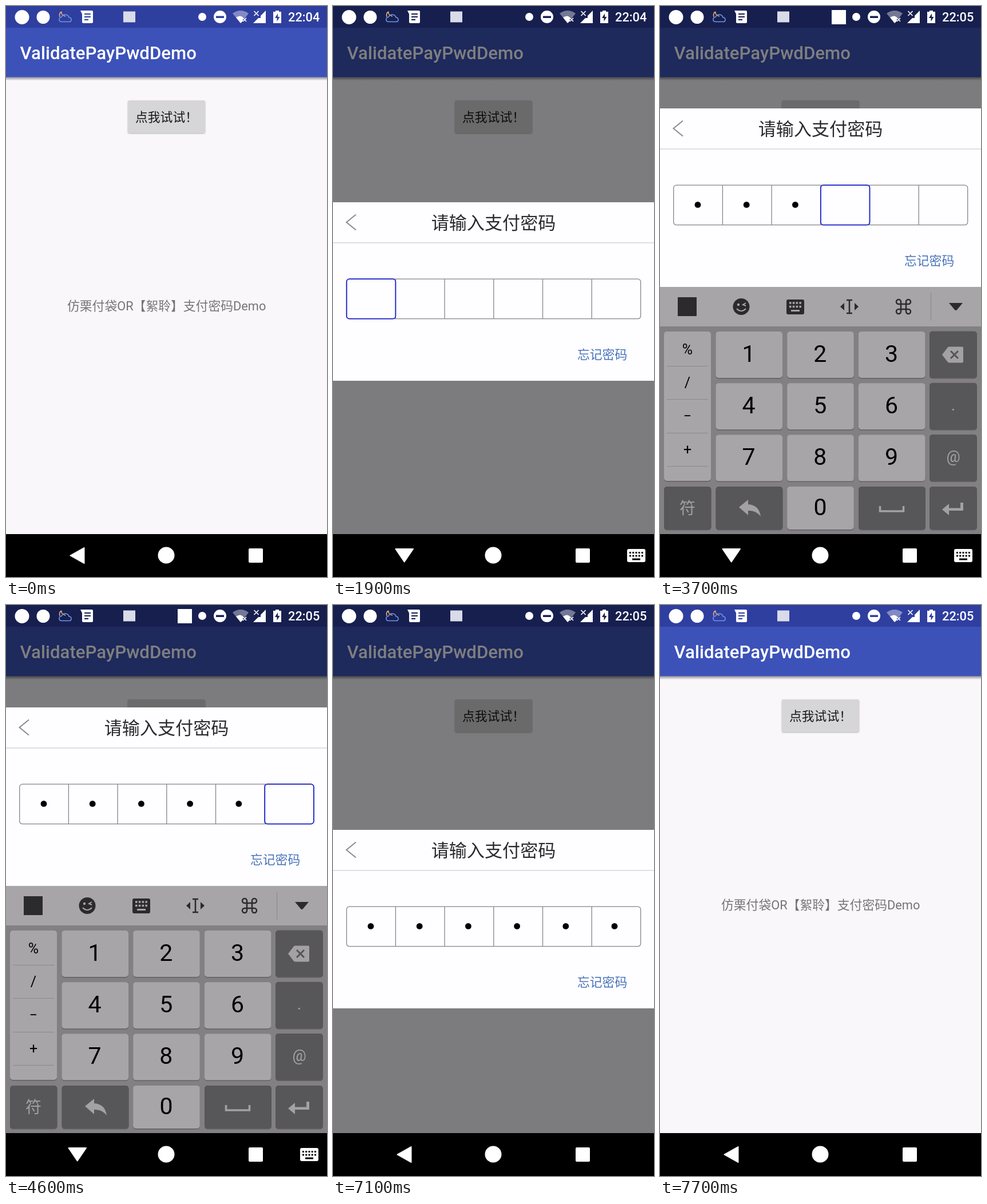
An HTML page that plays this animation: 561 by 998 pixels, repeating every 8000 ms.

```html
<!DOCTYPE html>
<html lang="zh-CN">
<head>
<meta charset="utf-8">
<title>ValidatePayPwdDemo</title>
<style>
html, body { margin: 0; width: 100%; height: 100%; overflow: hidden; background: #000; }
svg { display: block; width: 100%; height: 100%; }
text { font: 21.8px Roboto, "Noto Sans CJK SC", "Noto Sans CJK", sans-serif; white-space: pre; }
.mid { text-anchor: middle; }
.line { fill: none; stroke-linecap: butt; }
</style>
</head>
<body>
<svg viewBox="0 0 561 998" lang="zh-CN">
  <defs>
    <linearGradient id="shade" x2="0" y2="1">
      <stop stop-color="#000" stop-opacity=".4"/><stop offset="1" stop-color="#000" stop-opacity="0"/>
    </linearGradient>
    <filter id="lift" x="-10%" y="-10%" width="120%" height="130%">
      <feDropShadow dx="0" dy="1" stdDeviation="1.3" flood-opacity=".3"/>
    </filter>
  </defs>

  <g id="app">
    <rect width="561" height="923" fill="#faf7fb"/>
    <rect width="561" height="124.500" fill="#3c52b9"/>
    <rect width="561" height="38" fill="#2f3f9f"/>
    <rect y="124.500" width="561" height="6" fill="url(#shade)"/>
    <text x="24.600" y="93" fill="#fff" style="font-size:31.2px;font-weight:500">ValidatePayPwdDemo</text>
    <rect id="button" x="213" y="165" width="135" height="57" rx="3" filter="url(#lift)"/>
    <text x="226" y="201.500" fill="#181818">点我试试！</text>
    <text x="107" y="532" fill="#757477">仿栗付袋OR【絮聆】支付密码Demo</text>
  </g>
  <rect id="dim" width="561" height="923" opacity="0"/>

  <g id="status" fill="#fff">
    <circle cx="28" cy="19.500" r="12.500"/>
    <circle cx="65" cy="19.500" r="11.500"/>
    <path class="line" d="M97 10q-1 6 7 8M97 10q-5 3-3 9" stroke="#e8b070" stroke-width="1.600"/>
    <path class="line" d="M97 27.500q-4 0-4-4t4-4q2-5 7-4.500t6 5q4 0 4 4t-4 3.500z" stroke="#6f96ea" stroke-width="1.600"/>
    <path fill-rule="evenodd" d="M130 8h20q2 0 2 2v18q0 2-2 2h-15q-2 0-2-2V14zM137 13v2h11v-2zM137 18v2h11v-2zM137 23v2h7v-2z"/>
    <rect x="205" y="9.500" width="21" height="19" fill="#d9dbe8"/>
    <rect id="imeMark" x="300" y="7" width="25" height="25"/>
    <circle cx="343" cy="19" r="7"/>
    <path fill-rule="evenodd" d="M374 8a11 11 0 1 1 0 22a11 11 0 1 1 0-22zM367 17.500v3.500h14v-3.500z"/>
    <path d="M396 13q14-10 28 0l-7 9h-3v4l-4 4z" opacity=".4"/>
    <path d="M402 20q8-5 12 0v6l-4 4z"/>
    <path class="line" d="M414 21l6 6m0-6l-6 6M433.500 9l8 8m0-8l-8 8" stroke="#fff" stroke-width="1.700"/>
    <path d="M454 8v22h-22l9-9h4v-4z"/>
    <path fill-rule="evenodd" d="M471 8h6v2h4v20h-14V10h4zM475 13l-5 8h3.500v6l5-8h-3.500z"/>
    <text id="clock" x="493" y="27" style="font-weight:500">22:04</text>
  </g>

  <g id="dialog">
    <rect width="561" height="312" fill="#fefdff"/>
    <path class="line" d="M0 70.800h561" stroke="#cfced1" stroke-width="1.300"/>
    <path class="line" d="M40 21.500L23.500 35L40 48.500" stroke="#8b8a8d" stroke-width="2"/>
    <text class="mid" x="280.500" y="47" fill="#2b2b2d" style="font-size:31.100px">请输入支付密码</text>
    <g id="cells" class="line" stroke="#858487" stroke-width="1.300">
      <rect x="23.700" y="134.200" width="514" height="69.500" rx="5"/>
    </g>
    <g id="dots"></g>
    <rect id="focus" y="134.200" width="85.700" height="69.500" rx="5" fill="none" stroke="#1c22cc" stroke-width="1.800"/>
    <text x="427" y="274.200" fill="#4874ba">忘记密码</text>
  </g>

  <g id="keyboard">
    <rect y="491" width="561" height="432" fill="#828083"/>
    <rect y="491" width="561" height="69" fill="#a7a5a8"/>
    <path class="line" d="M473.500 501v49" stroke="#89878a"/>
    <g fill="#2b2a2c">
      <rect x="31" y="509" width="33" height="33"/>
      <path d="M505 519h24l-10 12q-2 2-4 0z"/>
      <circle cx="142" cy="525.500" r="14.500"/>
      <rect x="221" y="513" width="31" height="26" rx="3"/>
      <path d="M322 519v13l-7-6.500zM340 519v13l7-6.500z"/>
      <path class="line" d="M326 514h10M326 537h10M331 514v23" stroke="#2b2a2c" stroke-width="2.500"/>
      <path class="line" transform="translate(425.500 525.500)" stroke="#2b2a2c" stroke-width="2.500"
        d="M-4.500-8.500A4 4 0 1 0-8.500-4.500H8.500A4 4 0 1 0 4.500-8.500V8.500A4 4 0 1 0 8.500 4.500H-8.500A4 4 0 1 0-4.500 8.500z"/>
    </g>
    <circle cx="137" cy="522" r="2.200" fill="#a7a5a8"/>
    <path class="line" d="M150 519l-5 3l5 2M134 529q8 8 16 0" stroke="#a7a5a8" stroke-width="2"/>
    <path class="line" d="M226 519h21M226 525.500h21" stroke="#a7a5a8" stroke-width="3.500" stroke-dasharray="3.500 2.300"/>
    <path d="M229 531h15v3h-15z" fill="#a7a5a8"/>
    <g id="keys"></g>
    <path class="line" d="M12 629.500h72M12 687.500h72M12 746.500h72M12 804.500h72" stroke="#8b898c"/>
    <g fill="#a3a1a4">
      <path d="M493 609.500l10-13q1-1 3-1h22q2 0 2 2v24q0 2-2 2h-22q-2 0-3-1z"/>
      <path class="line" d="M508 603l13 13m0-13l-13 13" stroke="#555457" stroke-width="3"/>
      <path d="M138 876l16-13v8q19 1 22 21q-9-11-22-10v8z"/>
      <path class="line" d="M384.500 874v9h41v-9" stroke="#a3a1a4" stroke-width="3.500"/>
      <path d="M493 880l12-10v7.500h20v-9.500h5v14h-25v8z"/>
    </g>
  </g>

  <g id="nav" fill="#fff">
    <rect y="923" width="561" height="75" fill="#000"/>
    <g stroke="#fff" stroke-width="2" stroke-linejoin="round">
      <path id="back" d="M112.500 960.500L136.500 947v27z"/>
      <path id="down" d="M109.500 949h30.500L124.700 971.500z"/>
    </g>
    <circle cx="280" cy="960" r="14.500"/>
    <rect x="424" y="948" width="25" height="25" rx="2"/>
    <g id="switcher">
      <rect x="514" y="949" width="32" height="23" rx="3"/>
      <path class="line" d="M518 955.500h24M518 961h24" stroke="#000" stroke-width="3" stroke-dasharray="3 2.250"/>
      <path d="M523 965.500h14v3h-14z" fill="#000"/>
    </g>
  </g>
</svg>
<script>
const $ = id => document.getElementById(id);
const make = (parent, tag, attrs, text = '') => {
  const node = document.createElementNS('http://www.w3.org/2000/svg', tag);
  for (const name in attrs) node.setAttribute(name, attrs[name]);
  node.textContent = text;
  parent.append(node);
  return node;
};
const show = (node, on) => node.setAttribute('visibility', on ? 'inherit' : 'hidden');
const clamp = v => Math.max(0, Math.min(1, v));
const ease = v => (1 - Math.cos(Math.PI * clamp(v))) / 2;

// Password cells
const CELL = 85.7;
const dots = Array.from({ length: 6 }, (_, i) => {
  if (i) make($('cells'), 'path', { d: `M${23.7 + i * CELL} 134.2v69.5` });
  return make($('dots'), 'circle', { cx: 66 + i * 85.2, cy: 168.4, r: 5.4 });
});

// Number pad
function key(x, y, w, h, dark) {
  make($('keys'), 'rect', { x, y: y + 1.5, width: w, height: h, rx: 5, fill: '#626063' });
  make($('keys'), 'rect', { x, y, width: w, height: h, rx: 5, fill: dark ? '#575659' : '#a7a5a8' });
}
function label(text, x, y, size, fill = '#000') {
  make($('keys'), 'text', { x, y, fill, class: 'mid', style: `font-size:${size}px` }, text);
}
key(7, 569, 82, 261);
[...'%/−+'].forEach((sign, i) => label(sign, 48, 609 + i * 58.2, 25));
for (let i = 0; i < 9; i++) {
  const col = i % 3, row = Math.floor(i / 3);
  key(97.5 + col * 124.7, 569 + row * 90.3, 116.5, 81);
  label(i + 1, 155 + col * 124.8, 622 + row * 90, 41);
}
for (let row = 0; row < 3; row++) key(471, 568.5 + row * 90.3, 83, 81.5, true);
for (const [x, w] of [[7, 82.5], [97.5, 117], [347, 117], [471, 83]]) key(x, 840, w, 75, true);
key(222.2, 840, 116.5, 75);
label('0', 280, 890, 41);
label('.', 512.5, 707, 28, '#a3a1a4');
label('@', 512.5, 797, 27, '#a3a1a4');
label('符', 48, 888, 28, '#a3a1a4');

const LOOP = 8000, STEP = 100, SLIDE = 300;
const OPEN = 686.4, CLOSE = 7021.5;
const TYPED = [3300, 3500, 3700, 4200, 4500, 4700];

function draw(t) {
  const pressed = t >= 500 && t < 1000;
  $('button').setAttribute('fill', pressed ? '#c5c4c7' : '#d6d5d8');

  const typing = t >= 2100 && t < 5600;
  const slide = 1 - ease((t - OPEN) / SLIDE) + ease((t - CLOSE) / SLIDE);
  const y = Math.round((typing ? 179 : 343) + 312 * slide);
  const closed = CLOSE + SLIDE;
  $('dialog').setAttribute('transform', `translate(0 ${y})`);
  show($('dialog'), t > OPEN && t < closed);
  $('dim').setAttribute('opacity', 0.5 * (clamp((t - 668) / SLIDE) - clamp((t - closed) / SLIDE)));

  const count = TYPED.filter(at => t >= at).length;
  dots.forEach((dot, i) => show(dot, i < count));
  show($('focus'), count < 6);
  $('focus').setAttribute('x', 23.7 + count * CELL);

  const shown = clamp((t - 1900) / 200) - clamp((t - 5600) / 200);
  $('keyboard').setAttribute('opacity', shown);
  $('keyboard').setAttribute('transform', `translate(0 ${(1 - shown) * 50})`);

  const ime = t >= 1900 && t < 5600;
  show($('imeMark'), ime && t >= 2000);
  show($('back'), !ime);
  show($('down'), ime);
  show($('switcher'), ime);
  $('clock').textContent = t < 3300 ? '22:04' : '22:05';
}

function tick() {
  const t = performance.now() % LOOP;
  draw(Math.floor(t / STEP) * STEP);
  requestAnimationFrame(tick);
}
tick();
</script>
</body>
</html>
```
